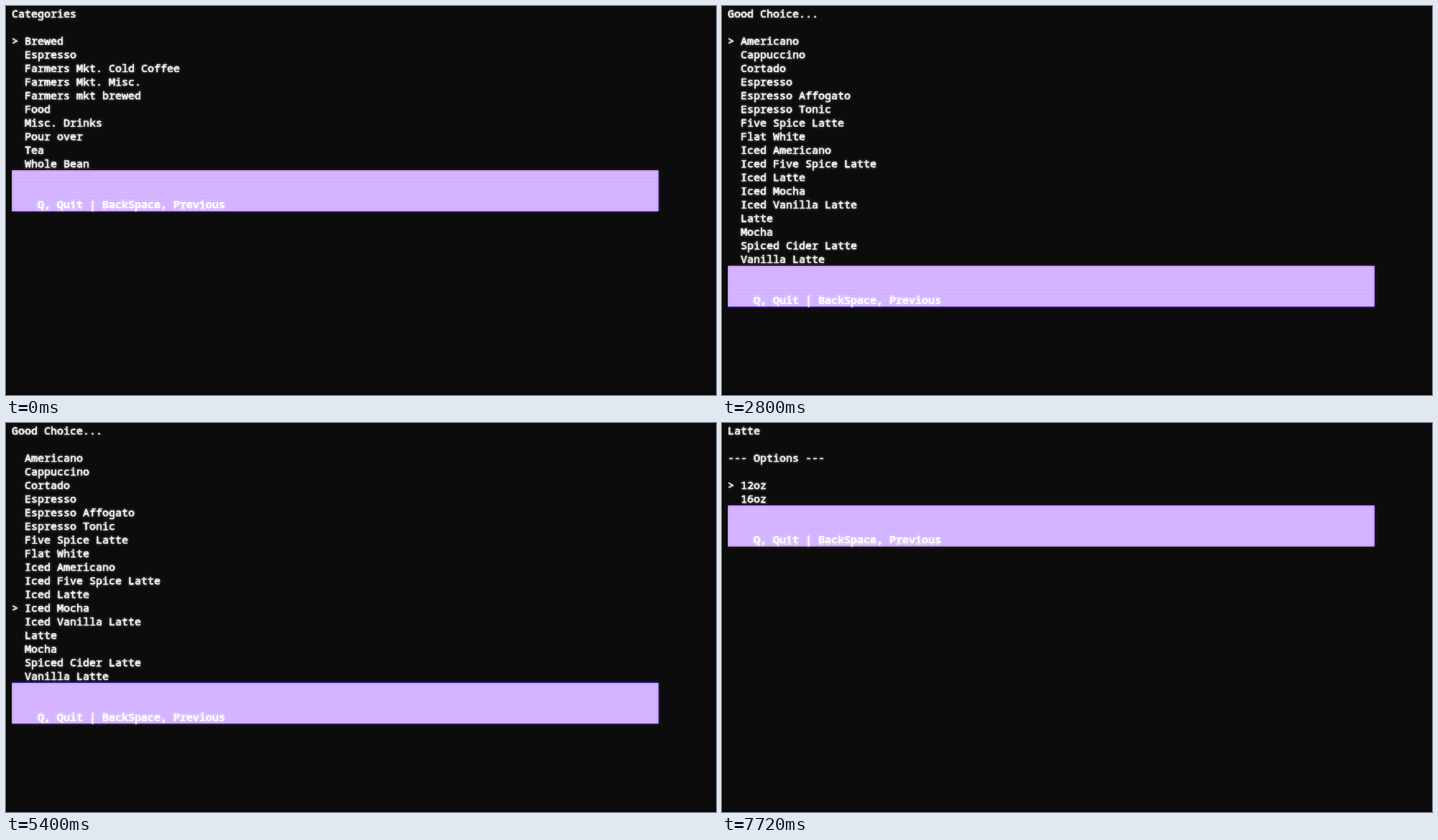
Recreate the animation shown at these times as an HTML page with a canvas. Size 988 by 542 pixels, loop 8000 ms.

```html
<!DOCTYPE html>
<html lang="en">
<head>
<meta charset="utf-8">
<title>Coffee menu</title>
<style>
  html, body { margin: 0; height: 100%; overflow: hidden; background: #0c0c0c; }
  canvas { display: block; }
</style>
</head>
<body>
<canvas id="stage" width="988" height="542"></canvas>
<script>
const W = 988, H = 542, LOOP = 8000, TICK = 1000 / 15;
const LEFT = 8, TOP = 1, CELL = 9, LINE = 19;
const ctx = document.getElementById('stage').getContext('2d');
const layer = Object.assign(document.createElement('canvas'), { width: W, height: H });
const term = layer.getContext('2d');

// Each run of key presses: [first press, gap, number of presses (negative moves up)]
const screens = [
  { start: 0, head: ['Categories', ''],
    items: ['Brewed', 'Espresso', 'Farmers Mkt. Cold Coffee', 'Farmers Mkt. Misc.', 'Farmers mkt brewed',
      'Food', 'Misc. Drinks', 'Pour over', 'Tea', 'Whole Bean'],
    runs: [[1200, 101, 3], [1600, 133, -2]] },
  { start: 2800, head: ['Good Choice...', ''],
    items: ['Americano', 'Cappuccino', 'Cortado', 'Espresso', 'Espresso Affogato', 'Espresso Tonic',
      'Five Spice Latte', 'Flat White', 'Iced Americano', 'Iced Five Spice Latte', 'Iced Latte',
      'Iced Mocha', 'Iced Vanilla Latte', 'Latte', 'Mocha', 'Spiced Cider Latte', 'Vanilla Latte'],
    runs: [[3130, 0, 1], [3670, 0, 2], [3870, 178, 4], [4930, 152, 6], [5940, 0, 1], [6260, 0, -1]] },
  { start: 6920, head: ['Latte', '', '--- Options ---', ''], items: ['12oz', '16oz'],
    runs: [[7460, 0, 1], [7720, 0, -1]] }
];

// Net movement of a run at time t, with presses snapped to the screen's refresh
function movement(t, [first, gap, presses]) {
  let moved = 0;
  for (let i = 0; i < Math.abs(presses); i++) {
    const time = first + Math.round(i * gap / TICK) * TICK;
    if (t >= Math.floor(time / 10) * 10) moved += Math.sign(presses);
  }
  return moved;
}

// The terminal area, and its brightly lit rows: every second pixel row
const viewport = new Path2D(), brightRows = new Path2D();
viewport.rect(LEFT, 0, W, H);
for (let y = 1; y < H; y += 2) brightRows.rect(0, y, W, 1);

function print(text, col, row) {
  const x = LEFT + col * CELL, y = TOP + row * LINE + 15;
  term.fillText(text, x, y);
  term.strokeText(text, x, y);
}

function drawTerminal({ head, items }, selected) {
  term.clearRect(0, 0, W, H);
  term.font = '15px "Noto Sans Mono", monospace';
  term.lineWidth = 0.4;
  term.fillStyle = term.strokeStyle = '#d4d4d4';
  head.forEach((text, row) => print(text, 0, row));
  items.forEach((text, i) => print((i === selected ? '> ' : '  ') + text, 0, head.length + i));

  const row = head.length + items.length;
  term.fillStyle = '#7d5af4';
  term.fillRect(LEFT, TOP + row * LINE, 100 * CELL, 3 * LINE);
  term.fillStyle = term.strokeStyle = '#fafafa';
  print('Q, Quit | BackSpace, Previous', 4, row + 2);
}

function addGlow() {
  ctx.globalAlpha = 0.7;
  ctx.drawImage(layer, 0, 0);
  ctx.globalAlpha = 0.55;
  ctx.filter = 'blur(1.6px)';
  ctx.drawImage(layer, 0, 0);
  ctx.filter = 'none';
}

function drawPointer(t) {
  if (t < 130 || t >= 2200) return;
  const k = Math.min(Math.floor((t - 130) / 68), 5);
  const left = (1 - k / 4) ** 2;
  const x = k < 5 ? Math.round(829 + 102 * left) : 843;
  const y = k < 5 ? Math.round(392 + 109 * left) : 405;
  ctx.fillStyle = '#fff';
  ctx.fillRect(x, y + 1, 1, 14);
  for (const end of [y, y + 15]) {
    ctx.fillRect(x - 3, end, 3, 1);
    ctx.fillRect(x + 1, end, 3, 1);
  }
}

function frame(now) {
  const t = now % LOOP;
  const screen = screens.findLast(s => s.start <= t);
  drawTerminal(screen, screen.runs.reduce((sum, run) => sum + movement(t, run), 0));

  ctx.fillStyle = '#0c0c0c';
  ctx.fillRect(0, 0, W, H);
  ctx.fillStyle = '#080808';
  ctx.fillRect(0, 538, W, 4);

  ctx.save();
  ctx.globalCompositeOperation = 'lighter';
  ctx.clip(viewport);
  addGlow();
  ctx.clip(brightRows);
  addGlow();
  ctx.restore();

  drawPointer(t);
  requestAnimationFrame(frame);
}
requestAnimationFrame(frame);
</script>
</body>
</html>
```
